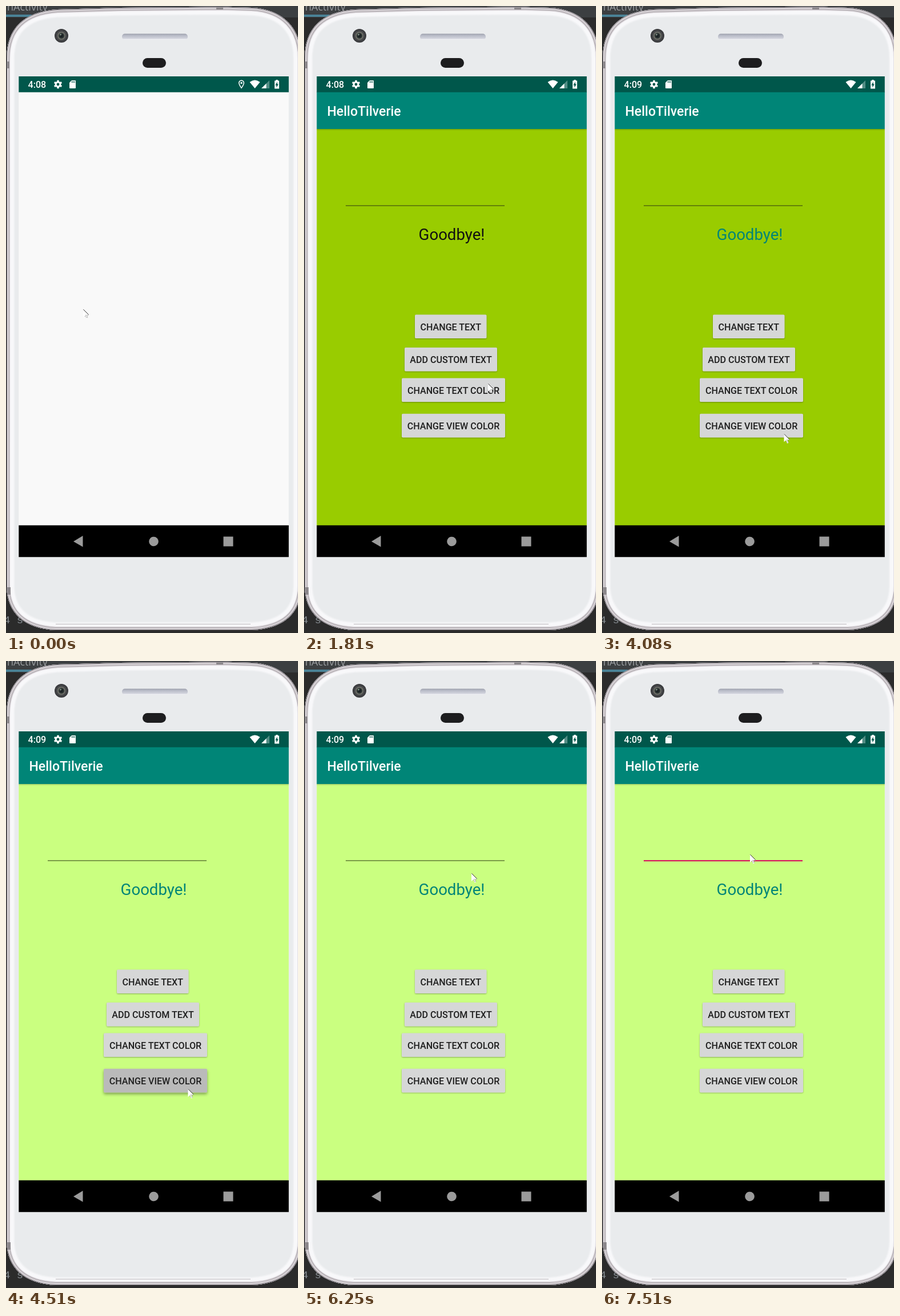
Recreate the animation shown at these times as an HTML page. Size 511 px wide and 1096 px high, loop 8 s.

```html
<!DOCTYPE html>
<html lang="en">
<head>
<meta charset="utf-8">
<title>Phone demo</title>
<style>
  html, body { margin: 0; width: 100%; height: 100%; overflow: hidden; background: #2b2b2b; }
  svg { display: block; width: 511px; height: 1096px; font-family: Roboto, "Open Sans", sans-serif; }
  .mid { text-anchor: middle; }
  .medium { font-weight: 500; }
  .label { font-size: 16.1px; fill: #1f1f1f; }
</style>
</head>
<body>
<svg viewBox="0 0 511 1096" xmlns="http://www.w3.org/2000/svg">
  <defs>
    <path id="body" d="M1 92C1 40 30 10 90 6L200 3 380 1.500 430 3C487 6 516.500 40 516.500 92V1012C516.500 1062 487 1088 430 1091H87C30 1088 1 1060 1 1012Z"/>
    <clipPath id="bodyClip"><use href="#body"/></clipPath>
    <clipPath id="screenClip"><path d="M22.300 123H494.800V963.300H22.300Z"/></clipPath>
    <linearGradient id="slot" x2="0" y2="1">
      <stop offset="0" stop-color="#9b9eaa"/><stop offset=".3" stop-color="#b9bcc8"/>
      <stop offset=".75" stop-color="#cfd1da"/><stop offset="1" stop-color="#f5f5f8"/>
    </linearGradient>
    <linearGradient id="drop" x2="0" y2="1">
      <stop offset="0" stop-opacity=".2"/><stop offset="1" stop-opacity="0"/>
    </linearGradient>
    <radialGradient id="lens">
      <stop offset="0" stop-color="#10151a"/><stop offset=".35" stop-color="#2c3433"/>
      <stop offset=".5" stop-color="#77786f"/><stop offset=".62" stop-color="#4b4c4e"/>
      <stop offset="1" stop-color="#343538"/>
    </radialGradient>
    <filter id="low" x="-10%" y="-20%" width="120%" height="150%">
      <feDropShadow dx="0" dy="1" stdDeviation=".9" flood-opacity=".32"/>
    </filter>
    <filter id="high" x="-10%" y="-30%" width="120%" height="180%">
      <feDropShadow dx="0" dy="3" stdDeviation="2.6" flood-opacity=".36"/>
    </filter>
  </defs>

  <!-- editor behind the phone -->
  <path fill="#2b2b2b" d="M0 0H511V1096H0Z"/>
  <path fill="#3c3f41" d="M0 0H511V20H0Z"/>
  <path fill="#4a8296" d="M0 15H45V19H0Z"/>
  <text x="2" y="8" font-size="18" fill="#9a9da0" font-family="Open Sans, sans-serif">nActivity</text>
  <text x="-4" y="1079" font-size="19" fill="#858b90" font-family="Liberation Mono, monospace">4 s</text>

  <!-- phone -->
  <g clip-path="url(#bodyClip)" fill="none">
    <use href="#body" fill="#e9ebed"/>
    <use href="#body" stroke="#f0f1f3" stroke-width="29"/>
    <use href="#body" stroke="#f8f8fa" stroke-width="25"/>
    <use href="#body" stroke="#e2dee2" stroke-width="13"/>
    <use href="#body" stroke="#a59fa4" stroke-width="10"/>
    <use href="#body" stroke="#d5d0d4" stroke-width="8"/>
    <use href="#body" stroke="#79747a" stroke-width="2"/>
    <path d="M87 1080.500H428" stroke="#bdb9bd"/>
    <path fill="#8c888c" d="M368 0H380V6H368ZM0 97H6V109H0ZM0 1016H8V1029H0Z"/>
  </g>
  <circle cx="97" cy="52" r="12" fill="url(#lens)"/>
  <circle cx="95.500" cy="50" r="1.500" fill="#7b8a80"/>
  <rect x="203" y="48.500" width="115" height="10.500" rx="5" fill="url(#slot)"/>
  <rect x="239" y="91" width="41" height="17" rx="8.500" fill="#1d1d1f"/>

  <g clip-path="url(#screenClip)">
    <path fill="#f9f9f9" d="M22 123H495V964H22Z"/>
    <g id="app">
      <path id="view" d="M22 215H495V908H22Z"/>
      <path fill="#008577" d="M22 150H495V215H22Z"/>
      <path fill="url(#drop)" d="M22 215H495V218H22Z"/>
      <text class="medium" x="40.500" y="192" font-size="23" fill="#fff">HelloTilverie</text>
      <path id="line"/>
      <path id="caret" fill="#d81b60" d="M73 298H75V326H73Z"/>
      <text id="word" class="mid" x="258.500" y="408.500" font-size="27.600">Goodbye!</text>
      <g id="buttons"></g>
    </g>

    <!-- status bar -->
    <path fill="#00574b" d="M22 123H495V150.700H22Z"/>
    <text id="clock" class="medium" x="38.500" y="143" font-size="16.100" fill="#fff"></text>
    <g fill="#fff">
      <g transform="translate(91 137)">
        <circle r="3.900" fill="none" stroke="#fff" stroke-width="3"/>
        <path id="teeth" fill="none" stroke="#fff" stroke-width="3.400"/>
      </g>
      <path d="M115 130H121Q122 130 122 131V143Q122 144 121 144H112Q111 144 111 143V134Z"/>
      <path stroke="#00574b" stroke-width="1.200" d="M115.500 131.500V134M117.700 131.500V134M119.900 131.500V134"/>
      <path id="pin" fill-rule="evenodd" d="M412 129.500C408.800 129.500 407 131.900 407 134.500C407 138.200 412 144.500 412 144.500S417 138.200 417 134.500C417 131.900 415.200 129.500 412 129.500ZM412 131C414.300 131 415.500 132.700 415.500 134.500C415.500 137 412 142 412 142S408.500 137 408.500 134.500C408.500 132.700 409.700 131 412 131ZM412 132.700A1.800 1.800 0 1 0 412 136.300A1.800 1.800 0 1 0 412 132.700Z"/>
      <path d="M426.500 133Q435.500 126 444.500 133L435.500 144Z"/>
      <path opacity=".32" d="M461 130V144H447Z"/>
      <path d="M455.500 135.500V144H447Z"/>
      <path d="M472.300 130.500V129H475.700V130.500H478V144.500H470V130.500Z"/>
    </g>
    <path fill="#00574b" d="M474.700 132.500V136.500H476.800L473.300 142.500V138.500H471.200Z"/>

    <!-- navigation bar -->
    <path d="M22 907.800H495V964H22Z"/>
    <g fill="#9b9b9b">
      <path d="M118 936L134.500 926V945.500Z"/>
      <circle cx="258.500" cy="936" r="8.300"/>
      <path d="M380.500 927.500H397.500V944.500H380.500Z"/>
    </g>
  </g>

  <g id="cursor">
    <path fill="#fff" d="M0 0V14L3.200 11.200 5.500 16.500 8 15.500 6 10.500H10Z"/>
    <path fill="none" stroke="#333" d="M.4 .4L9.600 9.600"/>
    <path fill="none" stroke="#777" stroke-dasharray="1 1" d="M4 10.500H9M3 12.500H8M5 14.500H8"/>
  </g>
</svg>
<script>
const LOOP = 8000;
const $ = id => document.getElementById(id);
const set = (el, attrs) => { for (const k in attrs) el.setAttribute(k, attrs[k]); };
const show = (el, on) => { el.style.display = on ? "" : "none"; };

// each step: start time, x, y; no position means hidden
const moves = [
  [0, 135, 530], [500, 234, 772], [820, 358, 960], [1210],
  [1810, 322, 660], [1930, 324, 681], [2360, 322, 681],
  [3160, 322, 704], [3280, 322, 732], [3400, 322, 748], [4080, 318.5, 748],
  [5440, 310, 715], [5590, 311, 668], [5720, 313, 608], [5860, 272, 295],
  [6010, 267, 263], [6130, 283, 325], [6250, 293, 371],
  [6400, 277, 347], [6550, 259, 338]
];

const rows = [
  ["CHANGE TEXT", 194, 539.5, 125.5], ["ADD CUSTOM TEXT", 176, 597, 162],
  ["CHANGE TEXT COLOR", 171, 650.5, 181], ["CHANGE VIEW COLOR", 171, 712.7, 181]
];

function make(tag, attrs, parent) {
  const el = document.createElementNS("http://www.w3.org/2000/svg", tag);
  set(el, attrs);
  return parent.appendChild(el);
}

const faces = rows.map(([label, x, y, width]) => {
  const face = make("rect", { x, y, width, height: 41.5, rx: 2 }, $("buttons"));
  make("text", { class: "mid medium label", x: x + width / 2, y: y + 27 }, $("buttons")).textContent = label;
  return face;
});

let teeth = "";
for (let i = 0; i < 6; i++) {
  const a = i * Math.PI / 3 + Math.PI / 6;
  teeth += `M${4.5 * Math.cos(a)} ${4.5 * Math.sin(a)}L${7.2 * Math.cos(a)} ${7.2 * Math.sin(a)}`;
}
set($("teeth"), { d: teeth });

function draw(t) {
  const within = (a, b) => t >= a && t < b;
  const open = t >= 1810, focus = t >= 6950;

  show($("app"), open);
  show($("pin"), !open);
  $("clock").textContent = t < 3810 ? "4:08" : "4:09";
  set($("view"), { fill: t < 4510 ? "#99cc00" : "#caff80" });
  set($("word"), { fill: t < 2640 ? "#111" : "#008577" });
  set($("line"), focus
    ? { fill: "#d81b60", d: "M73 348H351V350.300H73Z" }
    : { fill: "#2f3a10", d: "M73 348.400H351V349.600H73Z" });
  show($("caret"), within(6950, 7510));

  faces.forEach((face, i) => {
    const down = i === 2 && within(2640, 2760) || i === 3 && within(4510, 4630);
    set(face, { fill: down ? "#bababa" : "#d6d7d7", filter: down && i === 3 ? "url(#high)" : "url(#low)" });
  });

  const [, x, y] = moves.filter(m => m[0] <= t).pop();
  show($("cursor"), x !== undefined);
  if (x !== undefined) set($("cursor"), { transform: `translate(${x} ${y})` });
}

const start = performance.now();
function tick() {
  draw((performance.now() - start) % LOOP);
  requestAnimationFrame(tick);
}
draw(0);
requestAnimationFrame(tick);
</script>
</body>
</html>
```
